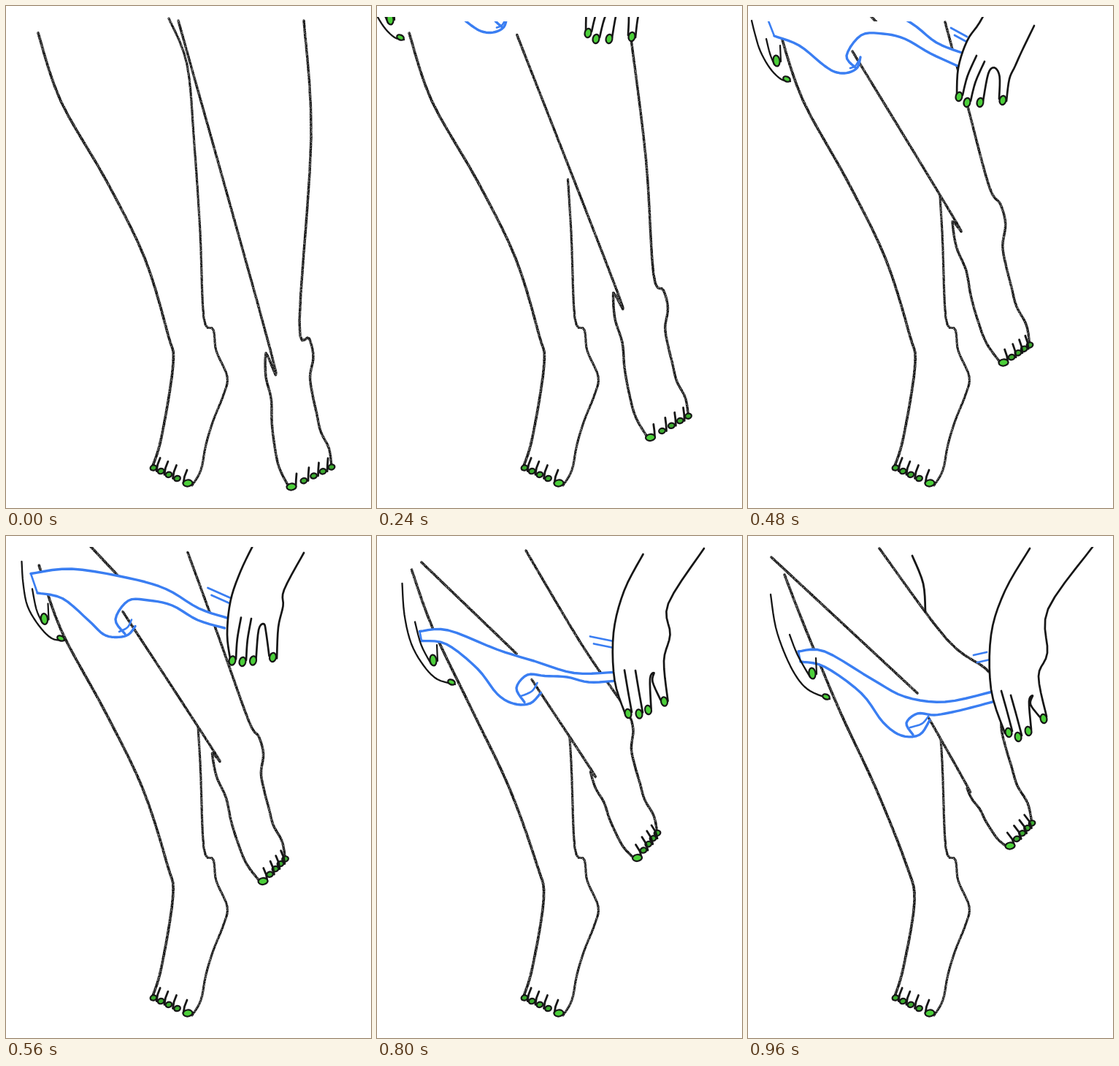
Recreate the animation shown at these times as an HTML page with a canvas. Size 500 by 687 pixels, loop 1.04 s.

```html
<!DOCTYPE html>
<html lang="en">
<head>
<meta charset="utf-8">
<style>
html, body { margin: 0; height: 100%; overflow: hidden; background: #fff; }
canvas { display: block; }
</style>
</head>
<body>
<canvas id="stage" width="500" height="687"></canvas>
<script>
const ctx = document.getElementById('stage').getContext('2d');
const STEP = 80, STEPS = 13;
const INK = '#161616', BLUE = '#3a7ef2', GREEN = '#4ccf3a';

const points = s => s.split(' ').map(p => p.split(',').map(Number));
const mix = (a, b, u) => a.map((v, i) => v + (b[i] - v) * u);
const blend = (p, q, u) => p.map((v, i) => mix(v, q[i], u));

// Key poses at given steps; before the first one the shape drifts in at a steady pace
function track(times, poses, drift = [0, 0]) {
  poses = poses.map(points);
  return step => {
    const wait = Math.min(step - times[0], 0);
    if (wait) return poses[0].map(([x, y]) => [x + wait * drift[0], y + wait * drift[1]]);
    let k = times.length - 2;
    while (times[k] > step) k--;
    return blend(poses[k], poses[k + 1], (step - times[k]) / (times[k + 1] - times[k]));
  };
}

// Joints of the lifted leg: inner hip, inner ankle, big toe, outer hip, thigh, knee, little toe
const joints = track([0, 4, 6, 8, 12], [
  '236,20 356,475 391,658 408,20 418,180 402,432 446,631',
  '177,46 313,365 369,568 327,45 352,220 371,345 420,538',
  '143,62 280,295 350,488 270,22 299,130 330,246 386,464',
  '177,145 285,300 354,457 228,23 285,150 335,260 379,420',
  '247,248 300,345 359,424 180,17 272,141 325,181 389,393']);
const frontThigh = track([8, 12], ['90,43 150,107', '32,29 232,215'], [-20, 35]);

const calf = track([0, 1], [
  '44,37 75,130 138,240 190,345 222,450 229,490 213,590 200,632',
  '50,53 78,125 126,240 175,345 217,450 228,500 213,590 201,630']);
const shin = points('223,17 248,80 258,190 266,310 271,427 284,443 288,472 303,507 298,532 284,567 274,600 267,635 255,656');

// Garment and hands arrive from above until step 6
const late = (drift, ...poses) => track([6, 8, 12], poses, drift);
const SLIP = [-8, 18.5], DROP = [0, 29], REACH = [7, 19];
const bandTop = late(SLIP,
  '20,0 90,-10 175,0 223,23 258,50 293,64',
  '48,103 90,100 160,115 215,122 270,148 312,160',
  '69,158 105,158 170,196 215,220 270,227 335,213');
const bandLow = late(SLIP,
  '36,41 70,54 105,82 122,91 138,91 150,84 154,70',
  '50,115 85,117 120,148 145,178 165,186 185,186 200,177',
  '72,172 105,179 155,215 185,255 210,273 235,272 249,252');
const opening = late(SLIP,
  '148,85 135,68 155,40 185,38 215,45 250,65 287,82',
  '178,183 165,160 180,137 205,138 240,145 275,165 312,170',
  '226,272 217,256 232,243 255,245 280,241 305,235 335,227');
const lining = late(SLIP, '140,85 147,82 152,74', '170,177 186,168 192,155', '222,262 238,257 247,247');
const strap = late(SLIP, '278,30 300,42', '275,112 316,128', '309,163 327,159');

const armL = late(DROP,
  '335,-10 317,23 300,48 288,85 286,125',
  '343,33 325,75 315,130 318,185 330,222',
  '386,17 352,75 333,135 333,210 352,270');
const armR = late(DROP,
  '392,27 375,62 366,82 358,100 354,130',
  '424,19 387,85 393,110 388,150 388,205',
  '472,15 411,100 410,160 398,192 409,247');
const tips = late(DROP,
  '289,124 300,132 318,132 349,129',
  '331,217 348,212 359,209 382,203',
  '357,269 370,275 384,267 405,250');
const lean = late([0, 0], '24,-56', '0,-62', '-10,-57');   // finger direction

const palm = late(REACH,
  '5,20 10,40 17,62 30,85 45,100 58,103',
  '38,50 37,90 42,130 60,160 80,180 102,183',
  '31,80 38,125 52,165 68,195 85,212 112,223');
const finger = late(REACH, '25,45 30,65 36,80', '47,100 53,135 63,157', '57,135 68,163 85,193');

// Points from a to b pushed sideways by shares of the distance
function bent(a, b, offsets) {
  const dx = b[0] - a[0], dy = b[1] - a[1];
  return offsets.map((o, i) => {
    const t = i / (offsets.length - 1);
    return [a[0] + dx * t + dy * o, a[1] + dy * t - dx * o];
  });
}

// Catmull-Rom curve, five points per span
function smooth(p) {
  const out = [], at = k => p[Math.max(0, Math.min(p.length - 1, k))];
  for (let j = 0; j <= (p.length - 1) * 5; j++) {
    const i = Math.floor(j / 5), u = j / 5 - i;
    const [a, b, c, d] = [at(i - 1), at(i), at(i + 1), at(i + 2)];
    out.push(b.map((v, k) => v + u / 2 * (c[k] - a[k] +
      u * (2 * a[k] - 5 * v + 4 * c[k] - d[k] + u * (3 * (v - c[k]) + d[k] - a[k])))));
  }
  return out;
}

function makeGrain() {
  const tile = document.createElement('canvas'), g = tile.getContext('2d');
  tile.width = tile.height = 96;
  let seed = 7;
  for (let i = 0; i < 96 * 96; i++) {
    seed = (seed * 16807) % 2147483647;
    const v = 18 + 110 * (seed / 2147483647) ** 2;
    g.fillStyle = `rgb(${v},${v},${v})`;
    g.fillRect(i % 96, Math.floor(i / 96), 1, 1);
  }
  return ctx.createPattern(tile, 'repeat');
}
const GRAIN = makeGrain();

function trace(pts) {
  ctx.beginPath();
  pts.forEach(p => ctx.lineTo(...p));
}
function line(pts, color, width) {
  trace(pts);
  ctx.strokeStyle = color;
  ctx.lineWidth = width;
  ctx.stroke();
}
function cover(...edges) {
  trace(edges.flat());
  ctx.fillStyle = '#fff';
  ctx.fill();
}
function nail([x, y], rx, ry, turn, fill = GREEN) {
  ctx.beginPath();
  ctx.ellipse(x, y, rx, ry, turn, 0, 7);
  ctx.fillStyle = fill;
  ctx.fill();
  ctx.strokeStyle = INK;
  ctx.lineWidth = 2.2;
  ctx.stroke();
}

function toes(big, little, slant) {
  for (let i = 4; i >= 0; i--) {
    const [x, y] = mix(big, little, (i / 4) ** .85);
    const side = Math.sign(little[0] - big[0]) * 6;
    if (i < 4) line([[x + side, y], [x + side + slant * .3, y - 9], [x + side + slant, y - 18]], INK, 2.8);
    if (i) nail([x, y], 4.4, 3.6, -.3, '#3cab30');
    else nail([x, y], 6.5, 4.5, -.1);
  }
}

function drawLegs(step) {
  line(smooth(calf((step / 12) ** 3)), GRAIN, 3.7);
  line(smooth(shin).slice(Math.min(step * 4, 12)), GRAIN, 3.2);
  toes([249, 653], [202, 632], 5);

  const [hipIn, ankle, big, hipOut, thigh, knee, little] = joints(step);
  const inner = smooth([
    ...bent(hipIn, ankle, [0, .015]),
    ...bent(ankle, [big[0] - 2, big[1] + 3], [0, -.03, -.02, -.045, -.055, -.05, 0])]);
  const outer = smooth([hipOut, thigh,
    ...bent(knee, little, [0, .04, .04, -.01, -.02, -.02, -.02, .01, 0])]);
  cover(inner, [...outer].reverse());
  line(inner, GRAIN, 3.5);
  line(outer, GRAIN, 3.5);
  toes(big, little, 1 - step * .9);
  line(frontThigh(step), GRAIN, 3.7);
  if (step > 11) line(smooth(points('225,27 240,65 243,104')), INK, 2.8);
}

function drawGarment(step) {
  const top = smooth(bandTop(step)), low = smooth(bandLow(step)), edge = smooth(opening(step));
  const back = strap(step);
  line(back, BLUE, 2.8);
  line(back.map(([x, y]) => [x + 5, y + 10]), BLUE, 2.8);
  cover(top, [...edge].reverse(), [...low].reverse());
  [top, low, edge].forEach(p => line(p, BLUE, 3.4));
  line(smooth(lining(step)), BLUE, 2.6);
  line([top[0], low[0]], BLUE, 2.6);
}

function drawLeftHand(step) {
  const edge = palm(step), side = finger(step), [x, y] = side[2], [px, py] = edge[5];
  line(smooth(edge), INK, 2.3);
  line(smooth(side), INK, 2.3);
  line([[x + 8, y - 26], [x + 9, y - 4]], INK, 2.2);
  nail([x + 3, y - 5], 4.5, 7.5, -.15);
  nail([px - 5, py - 3], 5, 3.4, .4);
}

function drawRightHand(step) {
  const left = smooth(armL(step)), right = smooth(armR(step)), ends = tips(step);
  const [[dx, dy]] = lean(step);
  cover(left, ends, [...right].reverse());
  line(left, INK, 2.7);
  line(right, INK, 2.7);
  for (const [x, y] of ends.slice(0, 2))
    line(smooth([[x + dx, y + dy], [x + dx * .4 + 2, y + dy * .5], [x + 5, y - 2]]), INK, 2.7);
  const [, , [ax, ay], [bx, by]] = ends, roof = ay + dy * .85;
  line(smooth([[ax + 4, ay - 2], [ax + 4 + dx * .3, roof + 8], [ax + 10 + dx * .4, roof],
    [bx - 14 + dx * .4, roof + 12], [bx - 5, by - 2]]), INK, 2.7);
  ends.forEach(p => nail(p, 4.4, 6.2, dx > 0 ? .2 : -.2));
}

function draw(step) {
  ctx.fillStyle = '#fff';
  ctx.fillRect(0, 0, 500, 687);
  ctx.save();
  ctx.beginPath();
  ctx.rect(0, 15, 500, 672);
  ctx.clip();
  ctx.lineCap = ctx.lineJoin = 'round';
  drawLegs(step);
  ctx.beginPath();
  ctx.rect(0, 21, 500, 666);
  ctx.save();
  ctx.clip();
  drawGarment(step);
  ctx.restore();
  drawLeftHand(step);
  drawRightHand(step);
  ctx.restore();
}

function tick() {
  draw(Math.floor(performance.now() / STEP) % STEPS);
  requestAnimationFrame(tick);
}
tick();
</script>
</body>
</html>
```
